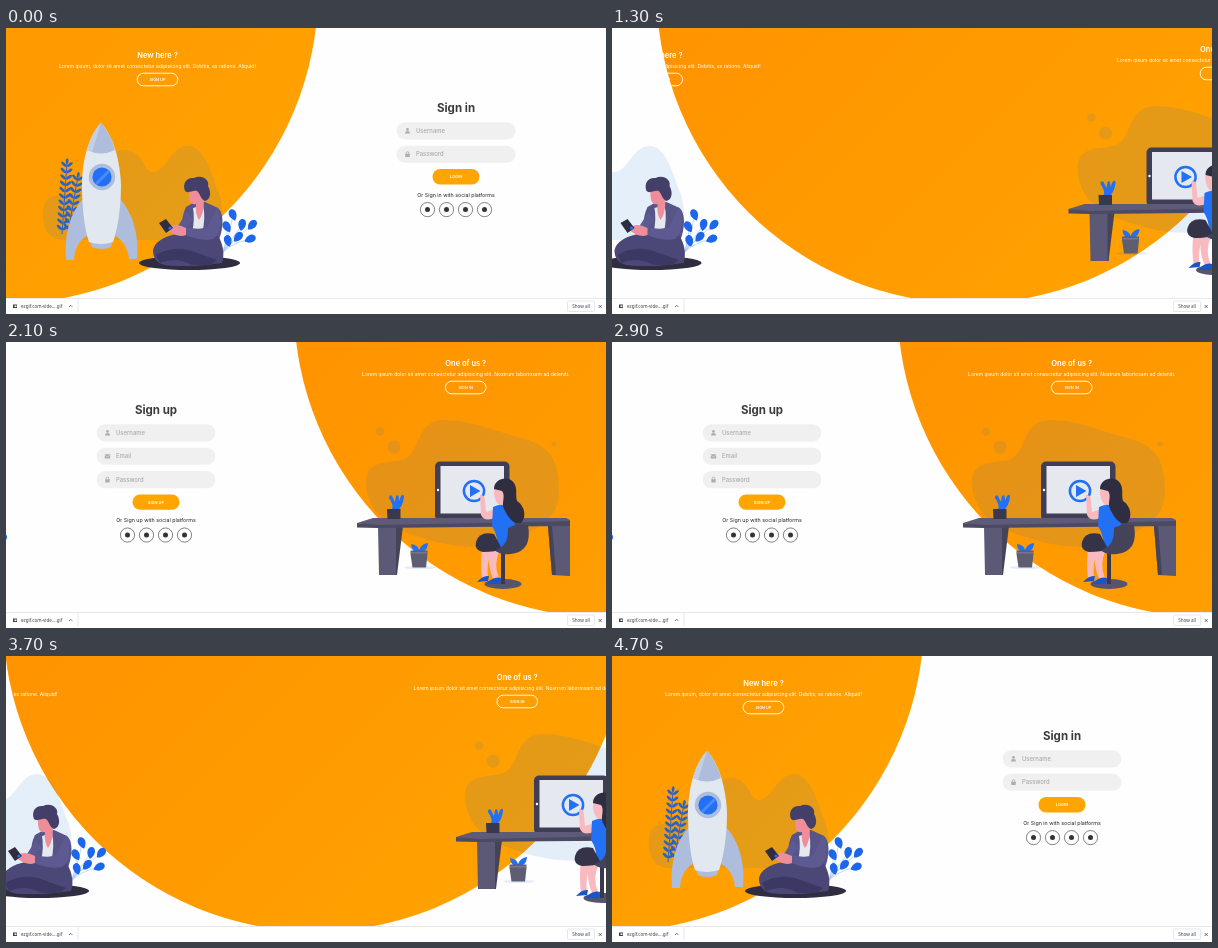
Write an HTML page that moves like this. It is 600 px wide and 286 px high and loops after 6000 ms.

```html
<!DOCTYPE html>
<html lang="en">
<head>
<meta charset="utf-8">
<title>Sliding sign in form</title>
<style>
  html, body { margin: 0; height: 100%; overflow: hidden; background: #fefefe; }
  svg { display: block; width: 100vw; height: 100vh; font-family: Inter, sans-serif; }
  .mid { text-anchor: middle; }
  .end { text-anchor: end; }
  .b { font-weight: 600; }
  .ui { font-family: "Noto Sans", sans-serif; }
  #chat { font-family: "Open Sans", sans-serif; font-size: 4.85px; fill: #6d7f8f; }
  #chat .b { fill: #f2f5f7; }
  .link { fill: #5b9bd3; }
</style>
</head>
<body>
<svg viewBox="0 0 600 286">
  <defs>
    <linearGradient id="sun" x1="1" y1="1" x2="0" y2="0">
      <stop stop-color="#ffa500"/><stop offset="1" stop-color="#ff8c00"/>
    </linearGradient>
  </defs>

  <g id="page">
    <rect width="600" height="286" fill="#fefefe"/>
    <g id="forms"><g id="signIn"></g><g id="signUp"></g></g>
    <circle id="disc" cy="-37" r="312.5" fill="url(#sun)"/>

    <g id="leftArt">
      <path fill="#1a73d0" opacity=".11" d="M37 190C36 165 48 169 62 166C95 160 95 118 122 122C138 126 138 144 147 144C160 144 165 118 182 118C200 118 206 150 214 168C218 185 220 212 200 212H60C45 212 38 205 37 190Z"/>
      <g id="fronds" fill="#2a63c4" stroke="#2a63c4"></g>
      <g fill="#aebddb">
        <path d="M78 170C64 185 58 205 60 232L68 232Q69 213 84 206Z"/>
        <path d="M113 170C127 185 133 205 131 231L123 231Q121 213 106 206Z"/>
        <path d="M83 212H107L105 219Q95 223 86 219Z"/>
      </g>
      <path fill="#e2e8f0" d="M95 95C83 107 76 132 76 157C76 182 79 203 83 214Q95 218 107 214C111 203 115 182 115 157C114 132 107 107 95 95Z"/>
      <path fill="#aebddb" d="M95 95C89 101 84 111 81 122Q95 129 109 122C106 111 101 101 95 95Z"/>
      <path fill="#c3cfe5" d="M95 95C89 101 84 111 81 122L86 124Z"/>
      <circle cx="96" cy="149" r="13.2" fill="#aebddb"/>
      <circle cx="96" cy="149" r="9.6" fill="#2270f4"/>
      <path d="M90 156L103 143" stroke="#4a8bf8" stroke-width="3"/>

      <ellipse cx="183.5" cy="235" rx="50.5" ry="7" fill="#2f2e41"/>
      <g id="sprig" fill="#1c66ea"></g>
      <path fill="#575488" d="M180 179C174 190 176 208 177 216H211C217 205 219 186 212 180L199 174L187 175Z"/>
      <path fill="#e6e8ee" d="M187 180L197 177Q200 190 196 206L186 206Q189 190 187 180Z"/>
      <path fill="#ee8e9a" d="M183 162Q188 157 193 164L198 171Q198 186 193 192Q189 186 190 176Q182 178 183 162Z"/>
      <path fill="#443f68" d="M179 163C176 155 181 149 188 150C196 146 204 152 202 158C206 165 204 172 199 173C195 172 194 165 191 163C186 162 183 166 179 163Z"/>
      <path fill="#4b4878" d="M176 205C160 207 147 214 147 224C148 235 156 238 170 238H190L216 235C220 225 215 208 209 206Q190 212 176 205Z"/>
      <path fill="#3b3863" d="M150 227Q165 218 183 222L211 232L205 237H186Q170 228 154 235Z"/>
      <path fill="#5d5a91" d="M211 179C217 190 215 207 207 211C197 213 186 210 178 206L180 199Q195 203 202 198Z"/>
      <path fill="#5d5a91" d="M181 184L172 198L177 203L187 192Z"/>
      <path fill="#ee8e9a" d="M180 200Q171 195 165 198L163 203Q172 210 180 207Z"/>
      <path fill="#2f2e41" d="M153 195L160 191L167 200L160 205Z"/>
      <circle cx="164" cy="200" r="1.6" fill="#2270f4"/>
    </g>

    <g id="rightArt">
      <g fill="#1a73d0" opacity=".11">
        <path d="M360 137C362 120 378 121 395 118C416 114 408 78 438 78C465 78 485 88 512 95C545 103 553 118 553 150C553 175 535 183 517 194C500 206 460 208 430 200C405 193 385 187 370 170C363 160 359 148 360 137Z"/>
        <circle cx="374" cy="89.5" r="4.3"/><circle cx="388" cy="105" r="6.600"/><circle cx="548" cy="102" r="2.6"/>
        <ellipse cx="414" cy="225.5" rx="16" ry="1.6"/>
      </g>
      <rect x="429" y="119.500" width="74.500" height="59" rx="5" fill="#403e55"/>
      <rect x="434.5" y="124" width="63.5" height="47.5" fill="#e6e8f0"/>
      <circle cx="432" cy="148" r="1.2" fill="#fff"/>
      <circle cx="468" cy="149" r="10.1" fill="none" stroke="#2270f4" stroke-width="2.5"/>
      <path d="M464 143V155L474.500 149Z" fill="#2270f4"/>

      <path fill="#5b5975" d="M372 184H391V233H373ZM542 184H564V234L546 233Z"/>
      <path fill="#454359" d="M390 184H397L391 233H390ZM542 184L546 184L550 233H546Z"/>
      <path fill="#5d5b77" d="M351 181L367 176H560L564 178V181L367 184Z"/>
      <path fill="#4c4a63" d="M351 181L372 183L564 179V184L372 186L351 185.5Z"/>

      <path fill="#2270f4" d="M386 168Q388 163 383 156Q383 152 386 154L389 160L390 154Q393 151 393 159L395 154Q398 151 398 155Q397 164 392 168Z"/>
      <path fill="#3a384c" d="M381 167H394.500V177H381.500Z"/>
      <path fill="#2270f4" d="M405 202Q412 203 413 208Q415 202 422 201Q422 206 418 209H408Q405 206 405 202Z"/>
      <path fill="#5e5d72" d="M404.500 208.500H421.500V212L420 225.500H406.500L404.500 212Z"/>
      <path fill="#77768c" d="M405 210H421V211.500H405Z"/>

      <ellipse cx="497" cy="242" rx="18.500" ry="5" fill="#56546f"/>
      <path d="M497 209V242" stroke="#3a384f" stroke-width="4"/>
      <g fill="#f8b9bf">
        <path d="M476 206L486 207Q480 222 482 236L476 237Q474 220 476 206Z"/>
        <path d="M484 206L494 208Q487 222 493 236L488 239Q480 222 484 206Z"/>
        <path d="M488 147Q487 158 494 164L499 161V146Z"/>
        <path d="M474 153Q479 152 479 159L480 170L489 167L490 175Q479 181 475 173Z"/>
      </g>
      <path fill="#1a55c8" d="M471 240Q477 233 483 234L482 239ZM481 242Q487 234 495 236L494 242Z"/>
      <path fill="#2270f4" d="M487 165Q497 160 507 166L509 186L503 208L490 210Q494 196 486 184Z"/>
      <path fill="#353347" d="M470 200Q473 189 488 192L496 207Q490 210 477 210Q468 208 470 200Z"/>
      <path fill="#45435a" d="M522 183C525 200 520 210 505 212C495 213 489 210 491 207C502 204 502 192 502 186Q510 181 522 183Z"/>
      <path fill="#2f2e41" d="M488 147C488 136 503 133 508 141C512 147 509 153 511 159C520 165 520 176 515 181C507 183 502 175 498 167C495 161 500 154 496 149Z"/>
    </g>
    <g id="leftText"></g><g id="rightText"></g>

    <g class="ui" font-size="4.55" fill="#3c4043">
      <rect y="270" width="600" height="16" fill="#fff"/>
      <path d="M0 270.500H600M72 271V284" stroke="#dcdee1" stroke-width=".7"/>
      <rect x="7" y="276.500" width="4" height="3.500" fill="#3c4043"/>
      <rect x="8.500" y="277.500" width="2" height="1.500" fill="#fff"/>
      <text x="15" y="280.200">ezgif.com-vide....gif</text>
      <path d="M63 279L64.700 277.300L66.400 279M592.700 277L595.700 280M595.700 277L592.700 280" fill="none" stroke="#3c4043" stroke-width=".7"/>
      <rect x="561.500" y="273" width="27" height="10.500" rx="1" fill="#fff" stroke="#dcdee1" stroke-width=".7"/>
      <text class="mid" x="575" y="280">Show all</text>
    </g>
  </g>
  <g id="chat"></g>
</svg>

<script>
const $ = id => document.getElementById(id);
const range = n => [...Array(n).keys()];

// ---- forms and panel texts ----
const icons = {
  Username: '<circle cy="-1.400" r="1.400"/><path d="M-2.500 2.600Q-2.500 .3 0 .3T2.500 2.600Z"/>',
  Email: '<rect x="-2.700" y="-2" width="5.400" height="4.200" rx=".5"/><path d="M-2.700 -1.200L0 .8L2.700 -1.200" fill="none" stroke="#f0f0f0" stroke-width=".6"/>',
  Password: '<rect x="-2.200" y="-.5" width="4.400" height="3.200" rx=".5"/><path d="M-1.300 0V-1.300A1.300 1.300 0 0 1 1.300 -1.300V0" fill="none" stroke="#acacac" stroke-width=".8"/>'
};

function form(title, button, top, fields) {
  const y = top + 14.2 + fields.length * 23.45;
  return `<text class="mid" y="${top + 4}" font-size="11.5" font-weight="700" fill="#3c3c3c">${title}</text>` +
    fields.map((name, i) => `<g transform="translate(0 ${top + 22.8 + i * 23.45})">
      <rect x="-59.4" y="-8.600" width="118.8" height="17.200" rx="8.600" fill="#f0f0f0"/>
      <g transform="translate(-48.500 0)" fill="#acacac">${icons[name]}</g>
      <text x="-40" y="2" font-size="5.9" font-weight="500" fill="#aaa">${name}</text></g>`).join('') +
    `<rect x="-23.500" y="${y}" width="47" height="15.300" rx="7.650" fill="#ffa500"/>
    <text class="mid b" y="${y + 9.1}" font-size="4" fill="#fff">${button}</text>
    <text class="mid" y="${y + 27.7}" font-size="5.3" fill="#222">Or ${title} with social platforms</text>` +
    range(4).map(i => `<g transform="translate(${i * 19 - 28.5} ${y + 40.5})" fill="#333">
      <circle r="7.1" fill="none" stroke="#333" stroke-width=".6"/><circle r="2.500"/></g>`).join('');
}
$('signIn').innerHTML = form('Sign in', 'LOGIN', 80, ['Username', 'Password']);
$('signUp').innerHTML = form('Sign up', 'SIGN UP', 68, ['Username', 'Email', 'Password']);

const panel = (x, y, title, line, button) => `<g class="mid" fill="#fff" transform="translate(${x} ${y})">
  <text class="b" y="2.700" font-size="7.5">${title}</text>
  <text y="13.1" font-size="5.03">${line}</text>
  <rect x="-20.300" y="18.200" width="40.600" height="12.600" rx="6.300" fill="none" stroke="#fff" stroke-width=".9"/>
  <text class="b" y="25.900" font-size="3.9">${button}</text></g>`;
$('leftText').innerHTML = panel(151.5, 27, 'New here ?',
  'Lorem ipsum, dolor sit amet consectetur adipisicing elit. Debitis, ex ratione. Aliquid!', 'SIGN UP');
$('rightText').innerHTML = panel(459.7, 21, 'One of us ?',
  'Lorem ipsum dolor sit amet consectetur adipisicing elit. Nostrum laboriosam ad deleniti.', 'SIGN IN');

// ---- plants ----
const leaf = (x, y, rx, ry, turn) =>
  `<ellipse rx="${rx}" ry="${ry}" transform="translate(${x} ${y}) rotate(${turn})" stroke="none"/>`;
const frond = (x, y, h, tilt, n) => `<g transform="translate(${x} ${y}) rotate(${tilt})">
  <path d="M0 0V${-h}"/>` + range(n).map(i => {
    const ly = -h * (i + 1) / (n + .5);
    return leaf(-3, ly, 3.4, 1.4, 40) + leaf(3, ly, 3.4, 1.4, -40);
  }).join('') + leaf(0, -h, 1.4, 3, 0) + '</g>';
$('fronds').innerHTML = frond(56, 206, 73, 4, 11) + frond(62, 205, 59, 10, 9);

const drops = [[227, 187, -20], [221, 199, -30], [236, 197, 10], [246, 197, 40], [232, 209, 40], [244, 211, 65], [222, 213, -15]];
$('sprig').innerHTML = drops.map(([x, y, a]) =>
  `<path d="M214 228Q222 216 ${x} ${y}" fill="none" stroke="#9fc0ee" stroke-width=".6"/>
  <path transform="translate(${x} ${y}) rotate(${a})" d="M0 6C-6 1 -4 -6 0 -6S6 1 0 6Z"/>`).join('');

// ---- messenger ----
const horn = '<path d="M55 -6L59.500 -8.500V-1.500L55 -4ZM56 -4H57.500V-1.800H56Z" fill="#f2f5f7"/>';
const film = '<rect x="63.500" y="-7" width="5.500" height="5" fill="#8f9aa5"/><path d="M63.500 -7.500L69 -8.500" stroke="#fff"/>';
const check = '<path d="M146 -5L147.500 -3L150.500 -8" fill="none" stroke="#77838e" stroke-width=".9"/>';
const poster = (a, b, c) => `<circle r="9" fill="${a}"/><path d="M-8 4Q-5 -5 0 3Q4 -6 8 4Q5 9 0 9T-8 4Z" fill="${b}"/>
  <circle cx="-3" cy="-2" r="2.300" fill="${c}"/><circle cx="4" cy="-2" r="2.300" fill="${c}"/>`;
const badge = `<circle r="9" fill="#e9b431"/><path d="M-7 -5Q0 -12 7 -5Z" fill="#4d98bd"/>
  <circle cx="-3" cy="-1" r="2.200" fill="#fff"/><circle cx="3" cy="-1" r="2.200" fill="#fff"/><path d="M-5 3H5Q0 9 -5 3Z" fill="#a64b29"/>`;
const hood = '<circle r="9" fill="#d8dadd"/><path d="M-7 5Q-5 -9 0 -9T7 5Q0 12 -7 5Z" fill="#24272c"/><ellipse cy="-1" rx="2.600" ry="3.500" fill="#eee"/><path d="M-4 4H4V6H-4Z" fill="#a93733"/>';
const link = s => `<tspan class="link">${s}</tspan>`;
const warn = '<tspan fill="#f2a52c">⚠</tspan>';

const row = (y, pic, title, sub, date = '', x = 63, extra = '') => `<g transform="translate(0 ${y})">
  <g transform="translate(40.500 0)">${pic}</g><g transform="translate(0 1.300)">${horn}${extra}</g>
  <text class="b" x="${x}" y="-1.900" font-size="5.1">${title}</text>
  <text class="end" x="229" y="-2">${date}</text><text x="54.500" y="7.600">${sub}</text></g>`;
const side = (y, name, icon, color = '#768594') => `<g transform="translate(14 ${y})" fill="${color}" stroke="none">
  ${icon}<text class="mid" y="11" font-size="4.5">${name}</text></g>`;
const count = n => `<circle cx="4.500" cy="-3.500" r="3" fill="#4d5c6a"/><text class="mid" x="4.500" y="-2" font-size="4" fill="#fff">${n}</text>`;
const folder = '<path d="M-5 -3H-1L0 -2H5V4H-5Z" fill="none" stroke="#768594"/>';
const robot = '<rect x="-4" y="-3" width="8" height="6.500" rx="2" fill="none" stroke="#768594"/><path d="M-2 0H-1M1 0H2M0 -3V-5" stroke="#768594"/>';
const sliders = '<path d="M-4 -3H4M-4 0H4M-4 3H4M-1 -4.500V-1.500M2 -1.500V1.500M-2 1.500V4.500" stroke="#768594" stroke-width=".9"/>';

$('chat').innerHTML = `<rect width="600" height="286" fill="#0e1621"/>
  <rect width="28" height="11" fill="#17212b"/><rect x="28" width="204" height="286" fill="#17212b"/>` +
  side(-3, 'All chats', '', '#5eaeeb') + side(21, 'Group', folder + count(6)) +
  side(45, 'Bot', robot + count(9)) + side(69.5, 'Edit', sliders) +
  row(11, poster('#3d4145', '#b89a78', '#d9c4a5'), 'Nine Lamps on Roads to Tarvel', link('@Nine_lamps_on_road_to_tarvel'), '', 71.5, film + check) +
  row(35, poster('#c8bda9', '#5f6872', '#bd7650'), 'Nine lamp road to Tarvel', link('@Ninelamproadtotarvel')) +
  row(59, poster('#a63a2c', '#3a2c2b', '#d6a17c'), 'Nine Lamps on road to Tarvel 1&amp;2 Hd', link('@Nine_lamps_on_road_to_tarvel')) +
  `<rect x="28" y="73" width="204" height="12" fill="#202b37"/><text x="35" y="80.600">Found 5 messages</text>` +
  row(96.5, badge, 'QZV MOVIES', link('@QZVmovies.Nine.Lamps.On.Road.To.Tarvel.Dophera.mkv,') + ' @QZVmovies...', '5.05.20') +
  row(120.5, badge, 'QZV MOVIES', link('Photo,') + ` Nine Lamps On Road To Tarvel dophera (2013) Hindi ${warn} Uploaded...`, '5.05.20') +
  row(144.5, badge, 'QZV MOVIES', link('QZVmovies.Nine.Lamps.On.Road.To.Tarvel.2010.BRRip..mp4,') + ' @QZVmovi...', '5.05.20') +
  row(168.5, badge, 'QZV MOVIES', link('Photo,') + ` Nine Lamps On Road To Tarvel (2010) Hindi ${warn} Uploaded on #Req...`, '5.05.20') +
  row(192.5, hood, 'Breezy TINKER™', 'MOVIES - @GEAR_HUM VOLM (2018) Hindi PreDVDRip - 1080p - x264 - AA...', '31.12.18', 70,
    '<circle cx="66" cy="-5" r="2.800" fill="#e8dfd5"/><circle cx="66" cy="-5" r="1.200" fill="#a5523f"/>') +
  `<rect x="232" width="368" height="286" fill="#0e1621"/>
  <rect x="364.500" y="113.500" width="103" height="11" rx="5.500" fill="#1e2c3a"/>
  <text class="mid b" x="416" y="120.800" font-size="4.8">Please select a chat to start messaging</text>`;

// ---- motion ----
const LOOP = 6000, STEP = 100, OPEN = 300, CLOSE = 2817, SLIDE = 250;
const CHAT = 4000, RESET = 4700;

// cubic-bezier(.42, 0, .58, 1)
function ease(x) {
  if (x <= 0) return 0;
  if (x >= 1) return 1;
  let lo = 0, hi = 1, s;
  for (let i = 0; i < 24; i++) {
    s = (lo + hi) / 2;
    const at = 1.26 * s * (1 - s) ** 2 + 1.74 * s * s * (1 - s) + s ** 3;
    if (at < x) lo = s; else hi = s;
  }
  return s * s * (3 - 2 * s);
}

const move = (id, x) => $(id).setAttribute('transform', `translate(${x} 0)`);

function draw(now) {
  const t = Math.floor(now % LOOP / STEP) * STEP;
  const part = (delay, time) => t >= RESET ? 0
    : t < CLOSE ? ease((t - OPEN - delay) / time) : 1 - ease((t - CLOSE - delay) / time);

  $('disc').setAttribute('cx', 601 * part(0, 1800) - .5);
  const art = SLIDE * part(400, 1100), text = SLIDE * part(600, 900);
  move('leftArt', -art);
  move('rightArt', SLIDE - art);
  move('leftText', -text);
  move('rightText', SLIDE - text);
  move('forms', 450 - 300 * part(700, 1000));
  const swap = part(700, 200);
  $('signIn').setAttribute('opacity', 1 - swap);
  $('signUp').setAttribute('opacity', swap);
  $('chat').style.display = t >= CHAT && t < RESET ? '' : 'none';
}

const start = performance.now();
function tick() {
  draw(performance.now() - start);
  requestAnimationFrame(tick);
}
tick();
</script>
</body>
</html>
```
